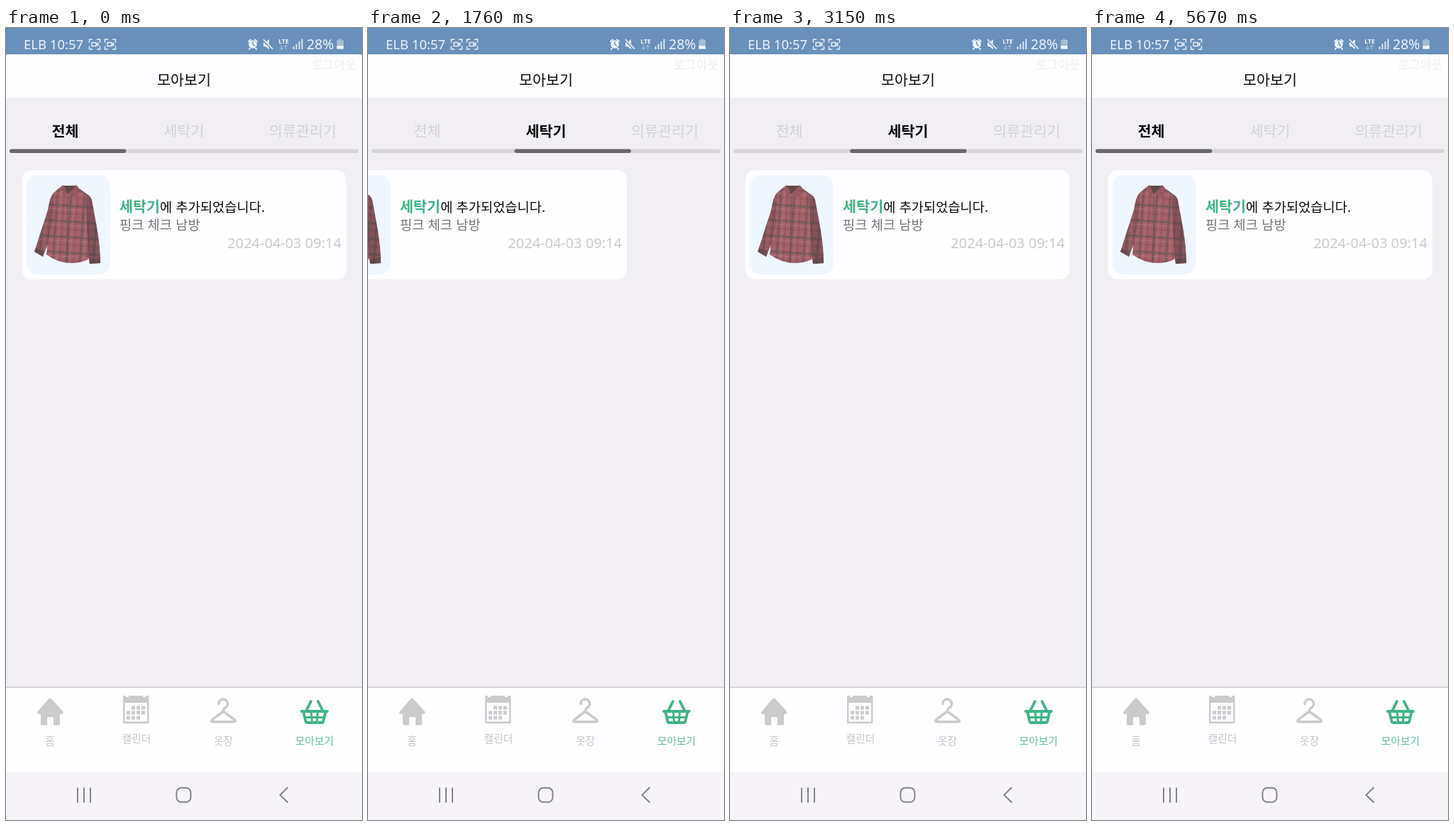
An HTML page for the animation above (6.12 s loop, 502x1115 px).

```html
<!DOCTYPE html>
<html lang="ko">
<head>
<meta charset="utf-8">
<style>
html, body { margin: 0; width: 100%; height: 100%; overflow: hidden; background: #f1eff3; }
svg { display: block; width: 100%; height: 100%; }
text { font-family: "Noto Sans CJK KR", "Noto Sans", sans-serif; }
.latin { font-family: "Noto Sans", "Open Sans", sans-serif; }
.mid { text-anchor: middle; }
.tab { font-size: 20.7px; fill: #d3d1d5; }
.tab.on { font-weight: 700; fill: #0b0a0c; }
.label { font-size: 14.8px; fill: #c6c4c8; }
.line { fill: none; stroke-linecap: round; stroke-linejoin: round; }
</style>
</head>
<body>
<svg viewBox="0 0 502 1115" preserveAspectRatio="none">
  <defs>
    <pattern id="plaid" width="19" height="22" patternUnits="userSpaceOnUse" patternTransform="translate(69 244) rotate(4)">
      <rect width="19" height="22" fill="#a8606a"/>
      <path d="M3 0V22M0 5H19" stroke="#5c5451" stroke-width="3.2" opacity=".65"/>
      <path d="M12.500 0V22M0 16H19" stroke="#6f4a50" stroke-width="1.200" opacity=".6"/>
      <path d="M8 0V22M0 10.500H19" stroke="#c08489" stroke-width="1" opacity=".5"/>
    </pattern>
    <g id="bracket" class="line" stroke="#e9f0f7" stroke-width="1.5">
      <path d="M0 4V0H4M11 0H15V4M15 10V14H11M4 14H0V10"/>
    </g>
    <path id="camera" class="line" stroke="#e9f0f7" stroke-width="1.4" d="M3.5 4.5H9.5V9.5H3.5ZM9.5 7L12.3 5V9Z"/>
    <g id="card">
      <rect x="22.5" y="200" width="457.5" height="154" rx="14" fill="#fefdff"/>
      <rect x="29" y="207" width="117.5" height="140" rx="15" fill="#eff6fd"/>
      <path d="M78 223L67 232Q62 237 59 256L40 315L52 322L59 304L57 319Q74 331 91 331Q107 331 117 325L118 332L133 331Q133 312 129 286L121 242Q119 236 113 233L101 224L89 222Z" fill="url(#plaid)"/>
      <path d="M67 232Q62 237 59 256L40 315L52 322L66 275Z" fill="#43363a" opacity=".18"/>
      <path d="M113 233Q119 236 121 242L129 286Q133 312 133 331L118 332L114 285Z" fill="#43363a" opacity=".35"/>
      <path d="M40 315L52 322L54 317L42 309ZM118 332L133 331L132.500 323L117 325Z" fill="#4f4444" opacity=".5"/>
      <path d="M80 222H99L87 234Z" fill="#5f4a48"/>
      <path d="M78 223L81 221L87 234L81 238ZM99 221L102 224L99 239L88 234Z" fill="#965860"/>
      <path d="M87 236L86 331M66 244L58 310M114 244L117 324" fill="none" stroke="#5c4449" stroke-width="1" opacity=".6"/>
      <text x="160" y="258.500" font-size="18.700"><tspan font-size="20.700" font-weight="700" fill="#40b487">세탁기</tspan><tspan fill="#0b0a0c">에 추가되었습니다.</tspan></text>
      <text x="160" y="284" font-size="18.700" fill="#767478">핑크 체크 남방</text>
      <text class="latin" x="473" y="310" font-size="20" text-anchor="end" fill="#cccace">2024-04-03 09:14</text>
    </g>
  </defs>

  <rect width="502" height="1115" fill="#f1eff3"/>
  <g id="pages">
    <use href="#card"/>
    <use href="#card" x="502"/>
  </g>

  <!-- status bar -->
  <rect width="502" height="37" fill="#6890bb"/>
  <g fill="#eef4fa">
    <text class="latin" x="25" y="29.500" font-size="18.500">ELB 10:57</text>
    <text class="latin" x="424" y="30" font-size="19.500">28%</text>
    <text class="latin mid" x="391.500" y="22" font-size="8.500" font-weight="600">LTE</text>
    <use href="#bracket" x="117.500" y="16"/>
    <use href="#bracket" x="139.500" y="16"/>
    <use id="blink" href="#camera" x="117.500" y="16"/>
    <use href="#camera" x="139.500" y="16"/>
    <circle cx="348" cy="23" r="5.800"/>
    <path class="line" d="M342 19L345 16.500M354 19L351 16.500M344 28.500L343 30M352 28.500L353 30" stroke="#eef4fa" stroke-width="2"/>
    <path class="line" d="M348 19.500V23L350.500 25" stroke="#6890bb" stroke-width="1.500"/>
    <path d="M363 20H366L371 16V30L366 26H363Z"/>
    <path d="M362 16L376 30" stroke="#6890bb" stroke-width="3.500"/>
    <path d="M363 16L376 29.500" stroke="#eef4fa" stroke-width="1.700"/>
    <path id="data" class="line" d="M388.500 24V30M386.500 28L388.500 30L390.500 28M394.500 30V24M392.500 26L394.500 24L396.500 26" stroke="#eef4fa" stroke-width="1.300"/>
    <path d="M405.500 26V30M409.500 22.500V30M413.500 19V30M417.500 15.500V30" stroke="#eef4fa" stroke-width="1.700"/>
    <path d="M469 15.500H473.500V17H476V29.500H466.500V17H469Z" opacity=".45"/>
    <rect x="466.500" y="25" width="9.500" height="4.500"/>
  </g>

  <!-- header and tabs -->
  <rect y="37" width="502" height="61" fill="#fefdff"/>
  <text class="mid" x="251" y="81" font-size="20.700" fill="#0b0a0c">모아보기</text>
  <text x="494.500" y="57.500" font-size="17.300" text-anchor="end" fill="#eeecef">로그아웃</text>
  <text class="tab mid" x="83.500" y="152.500">전체</text>
  <text class="tab mid" x="251" y="152.500">세탁기</text>
  <text class="tab mid" x="418.500" y="152.500">의류관리기</text>
  <rect x="5" y="170.500" width="492" height="5.500" rx="2.750" fill="#d6d4d7"/>
  <rect id="thumb" x="5" y="170.500" width="164.300" height="5.500" rx="2.750" fill="#686669"/>

  <!-- bottom navigation -->
  <rect y="928" width="502" height="121" fill="#fefdff"/>
  <rect y="927.500" width="502" height="1.500" fill="#cfcdd0"/>
  <g fill="#cccacd">
    <path d="M60 944.500Q62 942.500 64 944.500L80 962Q82 965.500 78 966H76V979Q76 981.500 73.500 981.500H67V972Q67 970 65 970H60Q58 970 58 972V981.500H51.500Q49 981.500 49 979V966H46.500Q42.500 965.500 45 962Z"/>
    <path fill-rule="evenodd" d="M165 940H169V942H173V940H193V942H197V940H201.500V979H165ZM167.500 950V976.500H199V950Z"/>
    <g id="days"></g>
  </g>
  <path class="line" d="M300 951.500A6.300 6.300 0 1 1 309 957Q306.500 958.500 306.500 962L290.500 974Q288.500 976.700 292 976.700H321Q325 976.700 322.500 974L306.500 962" stroke="#cccacd" stroke-width="3.600"/>
  <g class="line" stroke="#40b487" stroke-width="3.800">
    <path d="M417 962H453M423.500 961L430 948M446.500 961L440 948M419.500 963L422.500 976Q423 978 425 978H445Q447 978 447.500 976L450.500 963"/>
    <path d="M430.500 963L431.500 977M439.500 963L438.500 977M422 970.500H448" stroke-width="3"/>
  </g>
  <text class="label mid" x="62" y="1008.500">홈</text>
  <text class="label mid" x="184" y="1006">캘린더</text>
  <text class="label mid" x="306.500" y="1008.500">옷장</text>
  <text class="label mid" x="435" y="1008.500" style="fill:#62c19c">모아보기</text>

  <!-- system keys -->
  <rect y="1048" width="502" height="67" fill="#f6f4f8"/>
  <g fill="none" stroke="#858387" stroke-width="2">
    <path d="M101 1069.500V1090.500M110 1069.500V1090.500M119 1069.500V1090.500"/>
    <rect x="240.500" y="1069.800" width="20" height="20" rx="6.500"/>
    <path d="M397.500 1069L386.500 1079.800L397.500 1090.500"/>
  </g>
</svg>
<script>
const LOOP = 6120, PAGE = 502, STEP = 30;
const $ = id => document.getElementById(id);
const pages = $('pages'), thumb = $('thumb'), blink = $('blink'), data = $('data');
const tabs = [...document.querySelectorAll('.tab')];

// Calendar squares: first and last column of each row
[[1, 3], [0, 3], [0, 2]].forEach(([first, last], row) => {
  for (let col = first; col <= last; col++) {
    $('days').innerHTML += `<rect x="${170 + col * 7}" y="${954.5 + row * 7}" width="5" height="5"/>`;
  }
});

// Each swipe: finger drag as [ms, progress] points, then an eased settle
const swipes = [
  { start: 580, from: 0, to: 1, drag: [[0, .04], [90, .22], [210, .645]], settle: 270 },
  { start: 1700, from: 1, to: 2, drag: [[0, .05], [60, .229], [230, .7]], settle: 310 },
  { start: 2880, from: 2, to: 1, drag: [[0, .18], [60, .688]], settle: 290 },
  { start: 4090, from: 1, to: 0, drag: [[0, .1345], [115, .69]], settle: 270 }
];

function progress({ drag, settle }, t) {
  for (let i = 1; i < drag.length; i++) {
    const [t0, a] = drag[i - 1], [t1, b] = drag[i];
    if (t <= t1) return a + (b - a) * (t - t0) / (t1 - t0);
  }
  const [release, reached] = drag[drag.length - 1];
  const u = Math.min(1, (t - release) / settle);
  return 1 - (1 - reached) * (1 - u) ** 4;
}

function pageAt(t) {
  const swipe = swipes.filter(s => t >= s.start).pop();
  if (!swipe) return 0;
  const held = Math.floor((t - swipe.start) / STEP) * STEP;
  return swipe.from + (swipe.to - swipe.from) * progress(swipe, held);
}

function draw(t) {
  const page = pageAt(t);
  pages.setAttribute('transform', `translate(${-page * PAGE} 0)`);
  thumb.setAttribute('x', 5 + page * 164);
  tabs.forEach((tab, i) => tab.classList.toggle('on', i === Math.round(page)));
  blink.setAttribute('visibility', t >= 4270 && t < 4670 ? 'hidden' : 'visible');
  data.setAttribute('opacity', t >= 580 && t < 1210 ? 1 : .4);
}

const begin = performance.now();
function tick() {
  draw((performance.now() - begin) % LOOP);
  requestAnimationFrame(tick);
}
tick();
</script>
</body>
</html>
```
